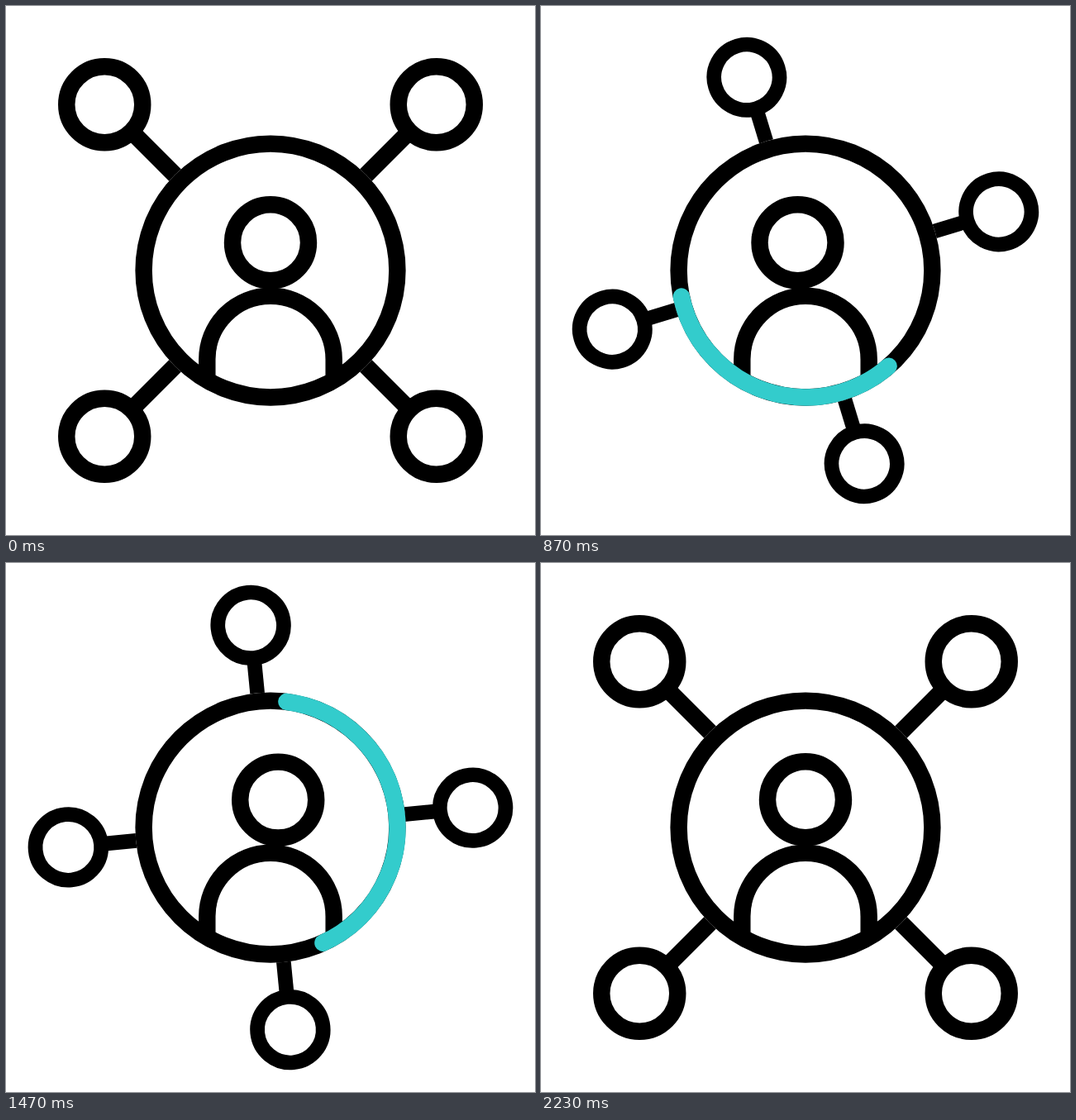
An HTML page that plays this animation: 640 px wide and 640 px high, repeating every 2.5 s.

```html
<!DOCTYPE html>
<html lang="en">
<head>
<meta charset="utf-8">
<title>Network</title>
<style>
  html, body { margin: 0; width: 100%; height: 100%; overflow: hidden; background: #fff; }
  svg { display: block; width: 100%; height: 100%; }
  .line { fill: none; stroke: #000; stroke-width: 20.45; }
  #sweep { stroke: #33cccc; stroke-linecap: round; }
</style>
</head>
<body>
<svg viewBox="0 0 640 640">
  <defs>
    <g id="node" class="line">
      <path d="M120 0H239"/>
      <circle cx="283.9" r="46"/>
    </g>
  </defs>
  <g transform="translate(320 320)">
    <g id="nodes">
      <use href="#node" transform="rotate(45)"/>
      <use href="#node" transform="rotate(135)"/>
      <use href="#node" transform="rotate(225)"/>
      <use href="#node" transform="rotate(315)"/>
    </g>
    <circle r="163.6" fill="#fff"/>
    <circle class="line" r="153.4"/>
    <path class="line" d="M-76.7 132.8V107.5A76.7 76.7 0 0 1 76.7 107.5V132.8"/>
    <circle id="head" class="line" cy="-33.8" r="46"/>
    <path id="sweep" class="line"/>
  </g>
</svg>
<script>
const LOOP = 2500, FPS = 30, RADIUS = 153.4;
const ARC_START = 14.1, ARC_SPAN = 305.3;
const nodes = document.getElementById('nodes');
const head = document.getElementById('head');
const sweep = document.getElementById('sweep');

// Progress from frame a to b along cubic-bezier(x1, 0, x2, 1).
function ease(f, a, b, x1 = 0.53, x2 = 0.47) {
  const x = (f - a) / (b - a);
  if (x <= 0) return 0;
  if (x >= 1) return 1;
  let lo = 0, hi = 1;
  for (let i = 0; i < 30; i++) {
    const u = (lo + hi) / 2, v = 1 - u;
    if (3 * x1 * u * v * v + 3 * x2 * u * u * v + u * u * u < x) lo = u; else hi = u;
  }
  return lo * lo * (3 - 2 * lo);
}

function point(deg) {
  const a = deg * Math.PI / 180;
  return (RADIUS * Math.cos(a)).toFixed(2) + ' ' + (RADIUS * Math.sin(a)).toFixed(2);
}

function drawNodes(f, turn) {
  const scale = 1 - 0.15 * (ease(f, 8, 31) - ease(f, 36, 67));
  nodes.setAttribute('transform', `rotate(${turn}) scale(${scale})`);
}

// The head leans left, dips across to the right, then settles.
function drawHead(f) {
  const x = 10.7 * (2 * ease(f, 33, 47) - ease(f, 15, 30) - ease(f, 48, 58));
  const y = 3.1 * ease(f, 33, 40) - 5.4 * ease(f, 40, 48) + 2.3 * ease(f, 48, 55);
  head.setAttribute('transform', `translate(${x} ${y})`);
}

function drawSweep(f, turn) {
  const tail = ARC_SPAN * ease(f, 20.55, 61.6, 0.52, 0.776);
  const lead = ARC_SPAN * ease(f, 13.38, 49.8, 0.033, 0.756);
  const base = ARC_START + turn;
  const large = lead - tail > 180 ? 1 : 0;
  sweep.setAttribute('d', lead - tail > 0.1
    ? `M${point(base + tail)}A${RADIUS} ${RADIUS} 0 ${large} 1 ${point(base + lead)}` : '');
}

function draw(ms) {
  const f = Math.floor(ms * FPS / 1000 + 0.15);
  const turn = 180 * ease(f, 8, 67);
  drawNodes(f, turn);
  drawHead(f);
  drawSweep(f, turn);
}

const start = performance.now();
function tick() {
  draw((performance.now() - start) % LOOP);
  requestAnimationFrame(tick);
}
tick();
</script>
</body>
</html>
```
